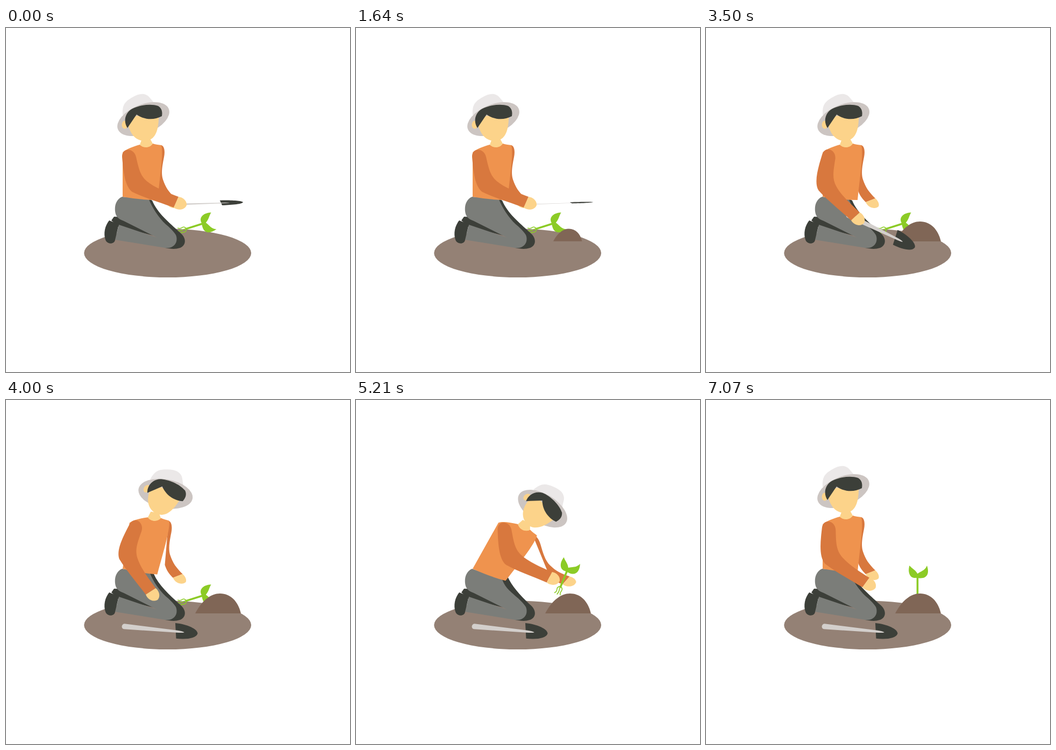
An HTML page for the animation above (7210 ms loop, 640 px wide and 640 px high).

```html
<!DOCTYPE html>
<html lang="en">
<head>
<meta charset="utf-8">
<title>Planting a seedling</title>
<style>
html, body { margin: 0; width: 100%; height: 100%; overflow: hidden; background: #fff; }
svg { display: block; width: 100vw; height: 100vh; }
.dark { fill: #3c3f39; } .pants { fill: #7b7d79; }
.shirt { fill: #ef934e; } .sleeve { fill: #d8783e; }
.skin { fill: #fcd38a; } .green { fill: #8ccb26; }
.root { fill: none; stroke: #8ccb26; }
</style>
</head>
<body>
<svg viewBox="0 0 640 640">
  <ellipse cx="300.7" cy="418.8" rx="155.5" ry="45.2" fill="#948175"/>
  <g id="backArm">
    <path class="sleeve" d="M289,218C295,220 296,230 294,240C291,255 288,270 292,282C297,297 303,305 315,317L297,324C290,317 285,310 282,300Z"/>
    <path class="skin" d="M297,324L315,317C320,321 323,328 321,332C315,338 302,335 297,324Z"/>
  </g>
  <g id="plant">
    <path class="root" stroke-width="3.6" d="M0,0V37"/>
    <path class="root" stroke-width="1.6" d="M0,35q-6,2 -4.5,7t-2,8M0,35q-1,4 0,7t-1,9M0,35q6,2 4.5,7t1,8"/>
    <path class="green" d="M1,-1C-3,-10 -10,-12 -15,-18C-19,-4 -13,9 1,4Z"/>
    <path class="green" d="M-4,4C-1,-8 13,-5 17.5,-18C23,-3 18,10 -4,4Z"/>
  </g>
  <path id="mound" fill="#806656" d="M352,397C365,372 382,360 398,360C418,360 432,375 437,397Z"/>
  <path id="backLeg" class="dark"/>
  <path class="dark" d="M196,358L201,351L225,352L290,390L210,370Z"/>
  <path id="frontLeg" class="pants"/>
  <path class="dark" d="M192,358L210,365L203,394C202,403 188,403 185,394C181,382 184,368 192,358Z"/>
  <path id="torso" class="shirt"/>
  <g id="shovel">
    <path class="dark" d="M98,-14.5C120,-14.5 140,-7 141,1C140,10 122,14.500 102,14Z"/>
    <path fill="#d3cfcc" d="M4,-5C-2,-4 -2,5 4,5L106,2.800Q116,2.500 116,1Q112,-.8 102,-1.200Z"/>
  </g>
  <g id="head">
    <path fill="#ebe8e8" d="M217,162C216,143 221,137 235,129C248,121 258,121 265,127C269,131 273,137 278,141L270,160Z"/>
    <ellipse cx="255.5" cy="169.5" rx="51" ry="27" transform="rotate(-22 255.5 169.5)" fill="#ccc5c2"/>
    <ellipse class="skin" cx="221" cy="180" rx="5.5" ry="7.5"/>
    <path class="skin" d="M226,165C226,195 241,210 257,210C275,210 285,196 284,160Z"/>
    <path class="dark" d="M226,186C219,176 220,161 232,152C245,144 268,140 283,145C291,150 291,158 290,164C275,172 257,171 243,161C238,168 232,177 226,186Z"/>
  </g>
  <path id="neck" class="skin"/>
  <g id="frontArm">
    <path class="sleeve" d="M216,240C215,222 238,222 242,240C247,262 250,275 262,285C276,297 300,306 321,314L312,334C285,324 255,315 235,305C220,294 218,262 216,240Z"/>
    <path class="skin" d="M312,334L321,314C330,315 337,322 336,330C332,339 320,340 312,334Z"/>
  </g>
</svg>
<script>
const LOOP = 7210, STEP = 500 / 7, STEPS_PER_BEAT = 11;
const HIP = [242, 318], HEM = [217, 314];
const el = id => document.getElementById(id);
const setPath = (id, d) => el(id).setAttribute("d", d);
const place = (id, value) => el(id).setAttribute("transform", value);

const mix = (a, b, k) => a.map((v, i) => v + (b[i] - v) * k);

// eased 0 to 1 between two beats
function ramp(b, from, to) {
  const k = Math.min(1, Math.max(0, (b - from) / (to - from)));
  return (k + k * k * (3 - 2 * k)) / 2;
}

function turn([x, y], deg) {
  const a = deg * Math.PI / 180, c = Math.cos(a), s = Math.sin(a);
  return [x * c - y * s, x * s + y * c];
}

// upper-body point carried by the lean, stretching slightly forward
function carry(x, y, lean) {
  const [dx, dy] = turn([x - HIP[0], y - HIP[1]], lean);
  const stretch = 1 + lean / 1000;
  return [HIP[0] + dx * stretch + lean * .07, HIP[1] + dy * stretch];
}

function pose(b) {
  const r = (from, to) => ramp(b, from, to);
  // two digging strokes of two beats each
  const c = b < 4 ? b % 2 : 2;
  const s = (from, to) => ramp(c, from, to);
  const patting = b > 7 && b < 8 ? Math.sin(Math.PI * (b - 7)) ** 2 : 0;
  const flat = .03 + s(.05, .5) - .84 * s(.6, 1.18) - .16 * s(1.2, 2) + .97 * r(4, 4.4);
  return {
    lean: 5 * (s(.5, 1) - s(1.2, 2)) + 5 * r(4.45, 5) + 20 * r(5, 5.45) - 6 * r(5.45, 5.73)
      - 19 * r(5.73, 6) + 47.4 * (r(6.1, 7) - r(8.3, 9)),
    front: 28 * s(.1, .5) - 8 * s(.5, 1) - 20 * s(1.2, 2) + 10 * r(3.2, 4) + 12 * r(4, 4.455)
      + 15 * r(4.455, 4.8) - 10 * r(4.8, 5.45) - 18 * r(5.45, 5.73) - 9 * r(5.73, 6)
      + 4.5 * r(6.1, 7) + 6 * patting + 7 * r(8.3, 9),
    back: -10 * (r(5.1, 5.5) - r(5.73, 6)) - 44 * r(6.1, 7) - 5 * r(7, 8) + 49 * r(8.3, 9),
    flat: Math.max(flat, .32 * (1 - b)),
    mound: .63 * r(1.2, 1.65) + .37 * r(3.2, 3.65),
    laid: r(4.5, 5),
    lifted: r(5.45, 5.73),
    planted: r(6.4, 7),
    sway: 8 * (r(7.8, 8) - r(8, 8.18))
  };
}

function drawBody(lean) {
  const bent = d => d.replace(/([\d.]+),([\d.]+)/g, (m, x, y) => carry(+x, +y, lean).join());
  const [hx, hy] = turn([65, 6], lean / 2);
  const hem = [HEM[0] + hx, HEM[1] + hy];
  const waist = mix(HEM, hem, .75 + lean * .005);
  const [mx, my] = mix(HEM, hem, .55);

  setPath("torso", `M${HEM}L` + bent("217,232C222,226 235,221 249,217C255,223 268,223 273,215C279,217 284,217 289,218C293,235 287,270 ")
    + `${hem}Q${mx},${my + 3} ${HEM}Z`);
  setPath("neck", bent("M249,217C255,224 268,224 273,215L268,206L253,206Z"));
  setPath("frontLeg", "M216,314C204,319 202,332 203,341C204,352 211,356 219,359L281,390L210,366L203,394"
    + `L296,409C314,411 321,397 316,385C311,377 303,370 297,365C284,353 ${waist[0] + 6},${waist[1] + 15} ${waist}Z`);
  setPath("backLeg", `M${waist[0] - 2},${waist[1] - 2}L${272 + lean * .35},${321 + lean * .27}`
    + `C${282 + lean * .25},345 304,362 323,380C336,390 336,404 324,409C315,412 306,411 296,409Z`);

  const nod = 24 * Math.min(1, lean / 5);
  const [x, y] = carry(261, 218, lean);
  place("head", `translate(${x} ${y - nod * .1}) rotate(${lean + nod}) translate(-261 -218)`);
}

function draw(b) {
  const p = pose(b);
  drawBody(p.lean);

  const [bx, by] = carry(289, 226, p.lean);
  place("backArm", `translate(${bx} ${by}) rotate(${p.back}) translate(-289 -226)`);
  const [cx, fy] = carry(229, 238, p.lean);
  const fx = cx + p.lean * .13;
  place("frontArm", `translate(${fx} ${fy}) rotate(${p.front}) translate(-229 -238)`);

  const [dx, dy] = turn([95, 90], p.front);
  const hand = [fx + dx, fy + dy];
  const [sx, sy, tilt] = mix([...hand, p.front * 1.25 - 2], [240, 423, 5], p.laid);
  place("shovel", `translate(${sx} ${sy}) rotate(${tilt}) scale(1 ${p.flat}) translate(-24 0)`);

  const held = [hand[0] + 27, hand[1] - 26, 35];
  const rooted = [393.5 + p.sway * .55, 326, p.sway];
  const [px, py, angle] = mix(mix([369, 363, 72.5], held, p.lifted), rooted, p.planted);
  place("plant", `translate(${px} ${py}) rotate(${angle})`);
  place("mound", `translate(392.5 396.5) scale(${p.mound}) translate(-392.5 -396.5)`);
}

const start = performance.now();
function frame() {
  const t = (performance.now() - start) % LOOP;
  draw(Math.floor((t + 5) / STEP) / STEPS_PER_BEAT);
  requestAnimationFrame(frame);
}
frame();
</script>
</body>
</html>
```
